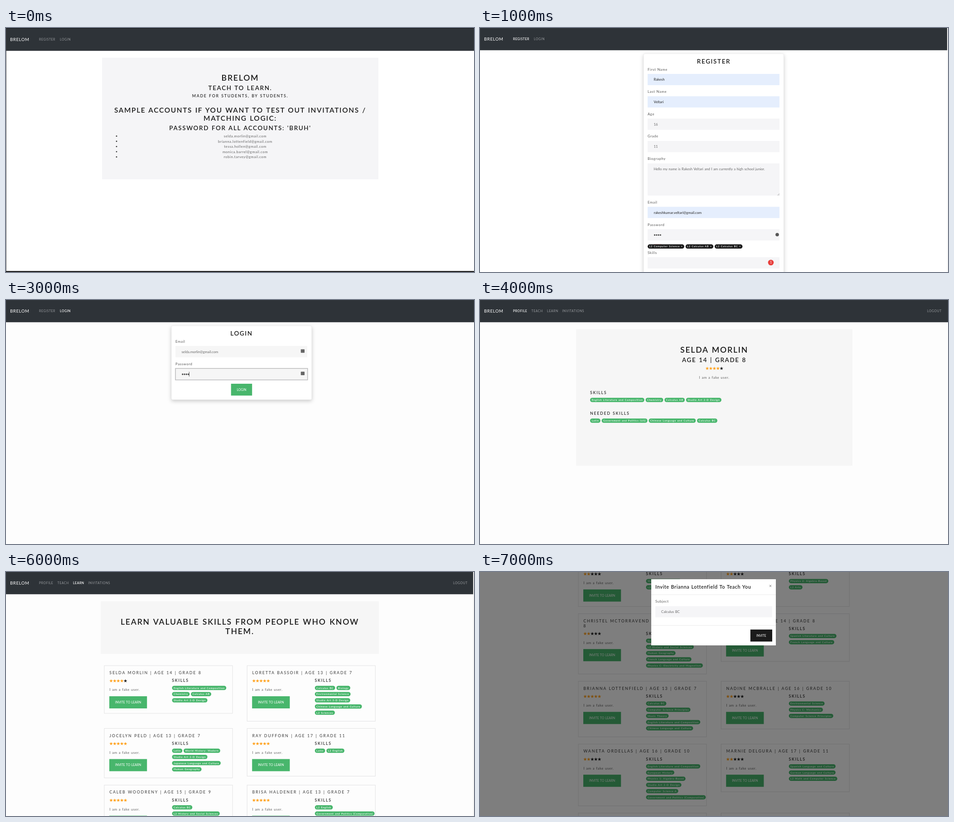
Write an HTML page that moves like this. It is 1033 by 542 pixels and loops after 8 s.

```html
<!DOCTYPE html>
<html lang="en">
<head>
<meta charset="utf-8">
<title>Peer tutoring walkthrough</title>
<style>
html, body { margin: 0; width: 100%; height: 100%; overflow: hidden; background: #fff; }
svg { display: block; width: 1033px; height: 542px; }
text { font-family: Lato, "Open Sans", sans-serif; word-spacing: .07em; white-space: pre; }
.card { filter: drop-shadow(0 3px 4px rgba(0, 0, 0, .2)); }
</style>
</head>
<body>
<svg id="stage" viewBox="0 0 1033 542" xmlns="http://www.w3.org/2000/svg"></svg>
<script>
const NS = 'http://www.w3.org/2000/svg';
const stage = document.getElementById('stage');
const GREEN = '#48b66c', INK = '#1a1a1a', GRAY = '#f5f5f7', BLUE = '#e5eefd', BAR = '#2e3338';
const BRAND = 'BRELOM', STEP = 1000;
let layer = stage;

function el(tag, attrs, parent = layer) {
  const node = document.createElementNS(NS, tag);
  for (const key in attrs) node.setAttribute(key, attrs[key]);
  parent.appendChild(node);
  return node;
}

const box = (x, y, x2, y2, fill, more) =>
  el('rect', { x, y, width: x2 - x, height: y2 - y, fill, ...more });
const line = (x1, y1, x2, y2, stroke, width = 1) =>
  el('line', { x1, y1, x2, y2, stroke, 'stroke-width': width });
const dot = (cx, cy, r, fill) => el('circle', { cx, cy, r, fill });

// size, letter spacing, weight, colour
const STYLES = {
  brand: [9.6, .6, 400, '#fff'],
  nav: [6.8, .65, 400, '#9a9da0'],
  navOn: [6.8, .6, 600, '#fff'],
  h1: [17.6, 1.8, 600, INK],
  h2: [15.4, 1.67, 600, INK],
  h3: [13.4, 1.65, 600, INK],
  h6: [8.8, 1.7, 600, '#2b2b2b'],
  name: [8.8, 1.8, 500, '#484848'],
  modal: [10.8, .6, 600, INK],
  body: [7.7, .62, 400, '#5f5f5f'],
  label: [7.7, .65, 400, '#555'],
  value: [7.7, 0, 400, '#666'],
  filled: [7.7, 0, 400, '#222'],
  btn: [6.9, 0, 400, '#fff'],
  tip: [6.6, .15, 400, '#fff'],
  tag: [5.8, .65, 600, '#fff']
};

// y is the middle of the capitals
function text(x, y, str, style, anchor = 'start') {
  const [size, gap, weight, fill] = STYLES[style];
  const node = el('text', {
    x, y: y + size * .36, fill, 'font-size': size, 'font-weight': weight,
    'letter-spacing': gap, 'text-anchor': anchor
  });
  node.textContent = str;
  return node;
}
const mid = (x, y, str, style) => text(x, y, str, style, 'middle');

function button(x, y, x2, y2, str, fill = GREEN) {
  box(x, y, x2, y2, fill);
  mid((x + x2) / 2, (y + y2) / 2, str, 'btn');
}

function tags(x, y, list, fill) {
  for (const str of list) {
    const pill = box(x, y - 4.8, x, y + 4.8, fill, { rx: 4.8 });
    const w = text(x + 3.4, y, str, 'tag').getComputedTextLength() + 6.8;
    pill.setAttribute('width', w);
    x += w + 2.8;
  }
}

function star(cx, cy, fill) {
  const pts = [];
  for (let i = 0; i < 10; i++) {
    const r = i % 2 ? 1.65 : 4, a = (i / 5 - .5) * Math.PI;
    pts.push((cx + r * Math.cos(a)).toFixed(2) + ',' + (cy + r * Math.sin(a)).toFixed(2));
  }
  el('polygon', { points: pts.join(' '), fill });
}
function stars(x, y, score) {
  for (let i = 0; i < 5; i++) star(x + 4 + 7.9 * i, y, i < score ? '#ffa21f' : '#222');
}

function scene(draw) {
  layer = el('g', {}, stage);
  box(0, 0, 1033, 542, '#fff');
  draw();
  return layer;
}

const GUEST = [[73, 'REGISTER'], [119, 'LOGIN']];
const MEMBER = [[73, 'PROFILE'], [113.5, 'TEACH'], [148, 'LEARN'], [181.5, 'INVITATIONS']];

function nav(links, active, width = 1033, y = 24.3, bottom = 49.4) {
  box(0, 0, width, bottom, BAR);
  text(9, y, BRAND, 'brand');
  for (const [x, str] of links) text(x, y, str, str === active ? 'navOn' : 'nav');
  if (links === MEMBER) text(987, y, 'LOGOUT', 'nav');
}

const tint = () => box(0, 0, 1033, 542, '#fdfdfd');
const panel = (x, y, x2, y2) =>
  box(x, y, x2, y2, '#fff', { rx: 3, class: 'card', stroke: '#e2e2e2', 'stroke-width': .6 });
const scrollEdge = () => { box(1031.5, 0, 1033, 542, '#fff'); line(1031.7, 0, 1031.7, 542, '#e4e4e4', .8); };

function field(x, y, label, value, fill = GRAY, height = 25) {
  text(x, y, label, 'label');
  box(x, y + 10.2, x + 291, y + 10.2 + height, fill);
  if (value) text(x + 13.5, y + 22.8, value, fill === BLUE ? 'filled' : 'value');
}
function secret(x, y) {
  for (let i = 0; i < 4; i++) dot(x + 4.25 * i, y, 1.65, '#444');
}

function home() {
  nav(GUEST, '', 1033, 25.8, 50.7);
  line(0, .5, 1033, .5, '#15181a');
  line(.4, 0, .4, 542, '#333', .8);
  box(0, 539.8, 1033, 542, '#111');
  box(212, 66, 822, 336, GRAY);
  mid(517, 111, BRAND, 'h1');
  mid(517, 133.5, 'TEACH TO LEARN.', 'h3');
  mid(517, 150.6, 'MADE FOR STUDENTS, BY STUDENTS.', 'h6');
  mid(517, 182.6, 'SAMPLE ACCOUNTS IF YOU WANT TO TEST OUT INVITATIONS /', 'h2');
  mid(517, 200.8, 'MATCHING LOGIC:', 'h2');
  mid(517, 222.4, "PASSWORD FOR ALL ACCOUNTS: 'BRUH'", 'h3');
  ['selda.morlin', 'brianna.lottenfield', 'tessa.hollen', 'monica.barrel', 'robin.tarvey']
    .forEach((user, i) => {
      const y = 240.2 + 11.55 * i;
      dot(244, y, 1.4, '#333');
      mid(528, y, user + '@gmail.com', 'body');
    });
}

function signup() {
  const courses = ['L2 Computer Science ×', 'L2 Calculus AB ×', 'L2 Calculus BC ×'];
  const x = 370;
  panel(361, -104, 670.5, 541.5);
  mid(516, -87, 'REGISTER', 'h3');
  field(x, -69.2, 'First Name', 'Rakesh', BLUE);
  field(x, -19.6, 'Last Name', 'Veltari', BLUE);
  field(x, 30, 'Age', '16');
  field(x, 79.7, 'Grade', '11');
  field(x, 129.5, 'Biography',
    'Hello my name is Rakesh Veltari and I am currently a high school junior.', GRAY, 71.5);
  line(656.5, 211, 661, 206.5, '#888', .7);
  line(659, 211, 661, 209, '#888', .7);
  field(x, 226, 'Email', 'rakeshkumar.veltari@gmail.com', BLUE);
  field(x, 275.8, 'Password');
  secret(385.5, 298.8);
  dot(656, 298, 3.8, '#555');
  line(384, 319.2, 401, 319.2, '#f3b4b4', 1);
  tags(x, 324.3, courses, INK);
  field(x, 338, 'Skills');
  dot(642, 360, 6.3, '#e8413e');
  mid(642, 360, '1', 'btn');
  tags(x, 386.4, courses, INK);
  field(x, 400.3, 'Courses');
  tags(x, 449, ['L2 US History ×'], INK);
  field(x, 462.3, 'Skills Needed / Things to Learn');
  box(460.5, 445, 571.5, 469, INK);
  el('path', { d: 'M512.5 469h7l-3.5 3.6z', fill: INK });
  mid(516, 452, "Press ',' to add skill to list of", 'tip');
  mid(516, 462, 'need-to-learn skills', 'tip');
  button(486, 506, 545.3, 532.5, 'REGISTER');
}

function signupTop() {
  const page = layer;
  layer = el('g', { transform: 'translate(0 161)' });
  signup();
  layer = page;
  nav(GUEST, 'REGISTER', 1031.5);
  scrollEdge();
}

function login() {
  tint();
  nav(GUEST, 'LOGIN');
  panel(365, 57.3, 674.8, 221.5);
  mid(520, 74, 'LOGIN', 'h3');
  field(374, 92, 'Email', 'selda.morlin@gmail.com', '#f6f6f6');
  field(374, 141.8, 'Password', '', '#f6f6f6');
  box(374, 152, 665.7, 177.5, 'none', { stroke: '#bdbdbf', 'stroke-width': 1.6 });
  secret(389.8, 165);
  line(404.3, 159.5, 404.3, 170, '#333', .8);
  for (const y of [109.5, 159.3]) box(650.7, y, 659, y + 7.8, '#666', { rx: .8 });
  button(496.7, 186, 543.2, 212.3, 'LOGIN');
}

function profile() {
  tint();
  nav(MEMBER, 'PROFILE');
  box(212, 65, 822, 368, '#f6f6f6');
  mid(517, 111, 'SELDA MORLIN', 'h1');
  mid(517, 133.5, 'AGE 14 | GRADE 8', 'h3');
  stars(497.5, 152, 4);
  mid(517, 172, 'I am a fake user.', 'body');
  text(243, 206, 'SKILLS', 'h6');
  tags(243, 222, ['English Literature and Composition', 'Chemistry', 'Calculus AB', 'Studio Art 2-D Design'], GREEN);
  text(243, 252, 'NEEDED SKILLS', 'h6');
  tags(243, 268, ['Latin', 'Government and Politics (US)', 'Chinese Language and Culture', 'Calculus BC'], GREEN);
}

// person: [title, score, badge rows split by "/" and within a row by ","]
function person(x, y, [title, score, skills], verb, head) {
  const names = title.split('\n'), rows = skills.split('/');
  const extra = 10.5 * (names.length - 1);
  const height = Math.max(106, 55 + 13.7 * rows.length) + extra;
  box(x, y, x + 283, y + height, 'none', { stroke: '#dfdfe1', 'stroke-width': .9 });
  names.forEach((str, i) => text(x + 11.3, y + 16 + 10.8 * i, str, 'name'));
  const top = y + extra;
  stars(x + 11, top + 33.9, score);
  text(x + 11.3, top + 53.6, 'I am a fake user.', 'body');
  button(x + 11, top + 68, x + 94.2, top + 95, 'INVITE TO ' + verb);
  text(x + 149.3, top + 33.2, head, 'h6');
  rows.forEach((row, i) => tags(x + 149.5, top + 49.5 + 13.75 * i, row.split(','), GREEN));
  return y + height;
}

function people(y, list, verb, head) {
  for (let i = 0; i < list.length; i += 2) {
    const left = person(217, y, list[i], verb, head);
    const right = person(532.2, y, list[i + 1], verb, head);
    y = Math.max(left, right) + 16;
  }
}

function listing(active, lines, list, head) {
  tint();
  nav(MEMBER, active, 1031.5);
  box(209, 65, 823, 182, '#f6f6f6');
  lines.forEach((str, i) => mid(516, 110.5 + 21 * i, str, 'h1'));
  people(208, list, active, head);
  scrollEdge();
}

const who = (name, age, grade) => `${name} | AGE ${age} | GRADE ${grade}`;
const LIT = 'English Literature and Composition';
const CHINESE = 'Chinese Language and Culture';
const ART = 'Studio Art 2-D Design';

const teach = () => listing('TEACH',
  ['TEACH THE SKILLS YOU KNOW IN ORDER TO GET MORE', 'FROM OTHERS IN THE FUTURE.'], [
    [who('SELDA MORLIN', 14, 8), 4, `Latin/Government and Politics (US)/${CHINESE}/Calculus BC`],
    [who('DELLA FENWHORLE', 16, 10), 3, `Physics 1: Algebra-Based/${ART}/Calculus AB,US History/Music Theory`],
    [who('TED MOLY', 13, 7), 3, `Chemistry/${LIT}`],
    [who('MELINDA CORVAN', 14, 8), 3, `Microeconomics,Biology/Calculus AB/${LIT}/Physics 1: Algebra-Based`],
    [who('JOCELYN PELD', 13, 7), 5, `L2 World Languages and Cultures/L2 Seminar/${LIT}`],
    [who('RAY DUFFORN', 17, 11), 5, `Environmental Science/Computer Science Principles/${LIT}`]
  ], 'NEEDED SKILLS');

const learn = () => listing('LEARN',
  ['LEARN VALUABLE SKILLS FROM PEOPLE WHO KNOW', 'THEM.'], [
    [who('SELDA MORLIN', 14, 8), 4, `${LIT}/Chemistry,Calculus AB/${ART}`],
    [who('LORETTA BASSOIR', 13, 7), 5,
      `Calculus BC,Biology/Environmental Science/Studio Art 3-D Design/${CHINESE}/L2 Sciences`],
    [who('JOCELYN PELD', 13, 7), 5,
      `Latin,World History: Modern/${ART}/Japanese Language and Culture/Human Geography`],
    [who('RAY DUFFORN', 17, 11), 5, 'Latin,L2 English'],
    [who('CALEB WOODRENY', 15, 9), 5, 'Calculus BC/L2 History and Social Sciences'],
    [who('BRISA HALDENER', 13, 7), 5, 'L2 English/Government and Politics (Comparative)']
  ], 'SKILLS');

function invite() {
  tint();
  people(-29.3, [
    [who('NORA FELDEN', 15, 9), 2, `${ART}/L2 Seminar`],
    [who('IVO TRENNAL', 13, 7), 2, 'Physics 2: Algebra-Based/L2 Arts'],
    ['CHRISTEL MCTORRAVEND | AGE 14 | GRADE\n8', 2,
      `${LIT}/L2 History and Social Sciences/Human Geography/French Language and Culture/Physics C: Electricity and Magnetism`],
    [who('SELMA DORIN', 14, 8), 2, 'Spanish Literature and Culture/French Language and Culture'],
    [who('BRIANNA LOTTENFIELD', 13, 7), 5,
      `Calculus BC/Computer Science Principles/Music Theory/${LIT}/${CHINESE}`],
    [who('NADINE MCBRALLE', 16, 10), 2, 'Environmental Science/Physics C: Mechanics/Computer Science Principles'],
    [who('WANETA ORDELLAS', 16, 10), 2,
      `${LIT}/European History/Physics 1: Algebra-Based/${ART}/Computer Science A/Government and Politics (Comparative)`],
    [who('MARNIE DELGURA', 17, 11), 2,
      'Spanish Language and Culture/German Language and Culture/L2 Math and Computer Science'],
    [who('OLGA RENDIS', 15, 9), 3, 'Latin'],
    [who('PAUL VESTRAM', 14, 8), 3, 'Biology']
  ], 'LEARN', 'SKILLS');
  box(0, 0, 1033, 542, '#000', { opacity: .5 });
  box(378, 16, 653, 163, '#fff');
  text(387, 33, 'Invite Brianna Lottenfield To Teach You', 'modal');
  line(638.8, 28.7, 643.2, 33.1, '#777', 1);
  line(638.8, 33.1, 643.2, 28.7, '#777', 1);
  line(378, 50.5, 653, 50.5, '#e6e6e6', .8);
  text(387, 65.5, 'Subject', 'label');
  box(387, 76, 645, 100.7, GRAY);
  text(400, 88.3, 'Calculus BC', 'value');
  line(378, 118.6, 653, 118.6, '#e6e6e6', .8);
  button(596.8, 127.8, 645, 154.5, 'INVITE', INK);
}

const scenes = [
  home, signupTop, () => { signup(); scrollEdge(); }, login, profile, teach, learn, invite
].map(scene);

let shown = -1;
function render(ms) {
  const now = Math.floor(ms / STEP) % scenes.length;
  if (now === shown) return;
  shown = now;
  scenes.forEach((g, i) => g.setAttribute('display', i === now ? 'inline' : 'none'));
}

const start = performance.now();
function tick() {
  render(performance.now() - start);
  requestAnimationFrame(tick);
}
tick();
</script>
</body>
</html>
```
